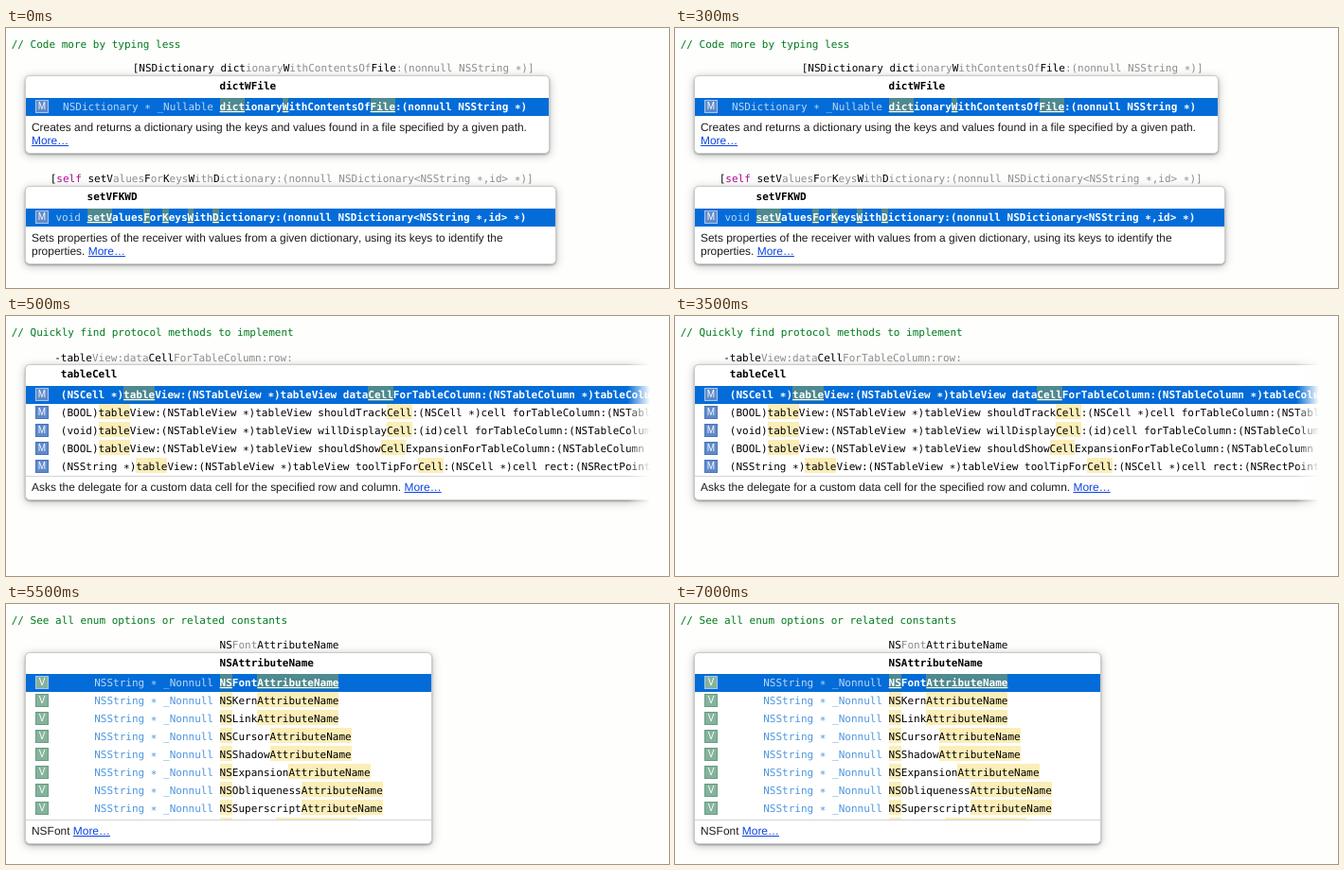
These frames come from a looping animation (700x275 px, 8 s). An HTML page:

```html
<!DOCTYPE html>
<html lang="en">
<head>
<meta charset="utf-8">
<title>Code completion</title>
<style>
  html, body { margin: 0; width: 100%; height: 100%; overflow: hidden; background: #fefefd; }
  .scene { position: absolute; left: 0; top: 0; width: 700px; height: 275px; overflow: hidden;
    visibility: hidden; animation: 8s step-end infinite; }
  #patterns { animation-name: first; }
  #methods { animation-name: second; }
  #constants { animation-name: third; }
  @keyframes first { 0% { visibility: visible } 6.25%, 100% { visibility: hidden } }
  @keyframes second { 0% { visibility: hidden } 6.25% { visibility: visible } 68.75%, 100% { visibility: hidden } }
  @keyframes third { 0% { visibility: hidden } 68.75%, 100% { visibility: visible } }

  .code, .doc, .panel, .bar, .badge, .rule, .fade, .clip { position: absolute; }
  .code { font: 11px/19px "DejaVu Sans Mono", monospace; white-space: pre; color: #000;
    text-rendering: geometricPrecision; }
  .code i { font-style: normal; color: #8e8e8e; }
  .code em { font-style: normal; color: #aa0d91; }
  .star { position: relative; top: 2px; }
  .comment { color: #007a1c; }
  .bold { font-weight: bold; }
  .type { color: #4f97e0; }
  .type.on { color: #b8d7f7; }
  .white { color: #fff; font-weight: bold; }
  mark { color: inherit; background: #fbeeb8; padding: 3px 0 0; }
  .white mark { background: #4f8a90; text-decoration: underline 1px; text-underline-offset: 1px;
    text-decoration-skip-ink: none; }
  .doc { font: 11.95px/14px "Liberation Sans", Arial, sans-serif; white-space: pre; color: #1c1c1c;
    text-rendering: geometricPrecision; font-kerning: none; }
  .doc u { color: #0b44e0; }
  .panel { box-sizing: border-box; background: #fff; border: 1px solid #cbcbcb; border-radius: 5px;
    box-shadow: 0 1px 2px rgba(0, 0, 0, .3), 0 2px 10px rgba(0, 0, 0, .25); }
  .bar { background: #036cd8; height: 19px; }
  .rule { height: 1px; background: #d4d4d4; }
  .badge { box-sizing: border-box; left: 31px; width: 14px; height: 14px; color: #fff; text-align: center;
    font: 10px/12px "Liberation Sans", Arial, sans-serif; }
  .M { background: #5f8acb; border: 1px solid #4a75b8; }
  .V { background: #84b39c; border: 1px solid #6a9c84; }
  .badge.on { border-color: #a9c6ea; }
  .clip { left: 0; top: 0; width: 700px; height: 228px; overflow: hidden; }
  .fade { left: 656px; top: 30px; width: 44px; height: 200px;
    background: linear-gradient(90deg, rgba(254, 254, 253, 0), #fefefd 24px); }
</style>
</head>
<body>
<div class="scene" id="patterns"></div>
<div class="scene" id="methods"></div>
<div class="scene" id="constants"></div>
<script>
const ADVANCE = 11 * 0.602;
const MORE = '<u>More…</u>';

// In text, [[...]] marks matched letters; y is the top of the 19px line.
const code = (x, y, text, cls = '') => {
  const html = text
    .replace(/\*/g, '<span class="star">*</span>')
    .replace(/\[\[(.*?)\]\]/g, '<mark>$1</mark>');
  return `<div class="code ${cls}" style="left:${x}px;top:${y}px">${html}</div>`;
};
const doc = (y, text) => `<div class="doc" style="left:27px;top:${y}px">${text}</div>`;
const box = (cls, x, y, w, h) =>
  `<div class="${cls}" style="left:${x}px;top:${y}px;width:${w}px${h ? `;height:${h}px` : ''}"></div>`;
const badge = (y, letter, on) =>
  `<div class="badge ${letter} ${on ? 'on' : ''}" style="top:${y + 2}px">${letter}</div>`;
const comment = text => code(5.7, 8, '// ' + text, 'comment');
const typeLabel = (x, y, text, on) =>
  code(x - (text.length + 1) * ADVANCE, y, text, on ? 'type on' : 'type');
const fill = (id, ...parts) => { document.getElementById(id).innerHTML = parts.join(''); };

const completion = (y, width, x, before, typed, query, type, match, lines) => [
  code(x + 0.8 - before.replace(/<.*?>/g, '').length * ADVANCE, y + 33, before + typed),
  box('panel', 20, y + 50, width, 83),
  code(x, y + 52, query, 'bold'),
  box('bar', 21, y + 74, width - 2),
  badge(y + 74, 'M', true),
  typeLabel(x, y + 74, type, true),
  code(x, y + 74, match, 'white'),
  ...lines.map((line, i) => doc(y + 98 + i * 14, line)),
].join('');

fill('patterns',
  comment('Code more by typing less'),
  completion(0, 554, 225.6, '[NSDictionary ',
    'dict<i>ionary</i>W<i>ithContentsOf</i>File<i>:(nonnull NSString *)]</i>',
    'dictWFile', 'NSDictionary * _Nullable',
    '[[dict]]ionary[[W]]ithContentsOf[[File]]:(nonnull NSString *)',
    ['Creates and returns a dictionary using the keys and values found in a file specified by a given path.', MORE]),
  completion(117, 561, 85.6, '[<em>self</em> ',
    'setV<i>alues</i>F<i>or</i>K<i>eys</i>W<i>ith</i>D<i>ictionary:(nonnull NSDictionary&lt;NSString *,id> *)]</i>',
    'setVFKWD', 'void',
    '[[setV]]alues[[F]]or[[K]]eys[[W]]ith[[D]]ictionary:(nonnull NSDictionary&lt;NSString *,id> *)',
    ['Sets properties of the receiver with values from a given dictionary, using its keys to identify the',
      'properties. ' + MORE]));

const delegateMethods = [
  ['NSCell *', 'data[[Cell]]ForTableColumn:(NSTableColumn *)tableColumn'],
  ['BOOL', 'shouldTrack[[Cell]]:(NSCell *)cell forTableColumn:(NSTableColumn *)'],
  ['void', 'willDisplay[[Cell]]:(id)cell forTableColumn:(NSTableColumn *)'],
  ['BOOL', 'shouldShow[[Cell]]ExpansionForTableColumn:(NSTableColumn *)'],
  ['NSString *', 'toolTipFor[[Cell]]:(NSCell *)cell rect:(NSRectPointer)rect'],
];
fill('methods',
  comment('Quickly find protocol methods to implement'),
  code(57.8 - ADVANCE, 35, '-table<i>View:data</i>Cell<i>ForTableColumn:row:</i>'),
  box('panel', 20, 51, 720, 144),
  code(57.8, 52, 'tableCell', 'bold'),
  box('bar', 21, 74, 700),
  ...delegateMethods.map(([type, name], i) => {
    const y = 74 + i * 19;
    return badge(y, 'M', !i) +
      code(57.8, y, `(${type})[[table]]View:(NSTableView *)tableView ${name}`, i ? '' : 'white');
  }),
  box('rule', 21, 169, 700),
  doc(174, 'Asks the delegate for a custom data cell for the specified row and column. ' + MORE),
  '<div class="fade"></div>');

const attributes = ['Font', 'Kern', 'Link', 'Cursor', 'Shadow', 'Expansion', 'Obliqueness', 'Superscript', 'ToolTip'];
fill('constants',
  comment('See all enum options or related constants'),
  code(225.6, 34, 'NS<i>Font</i>AttributeName'),
  box('panel', 20, 51, 430, 203),
  code(225.6, 53, 'NSAttributeName', 'bold'),
  box('bar', 21, 74, 428),
  '<div class="clip">',
  ...attributes.map((name, i) => {
    const y = 74 + i * 19;
    return badge(y, 'V', !i) +
      typeLabel(225.6, y, 'NSString * _Nonnull', !i) +
      code(225.6, y, `[[NS]]${name}[[AttributeName]]`, i ? '' : 'white');
  }),
  '</div>',
  box('rule', 21, 228, 428),
  doc(233, 'NSFont ' + MORE));
</script>
</body>
</html>
```
